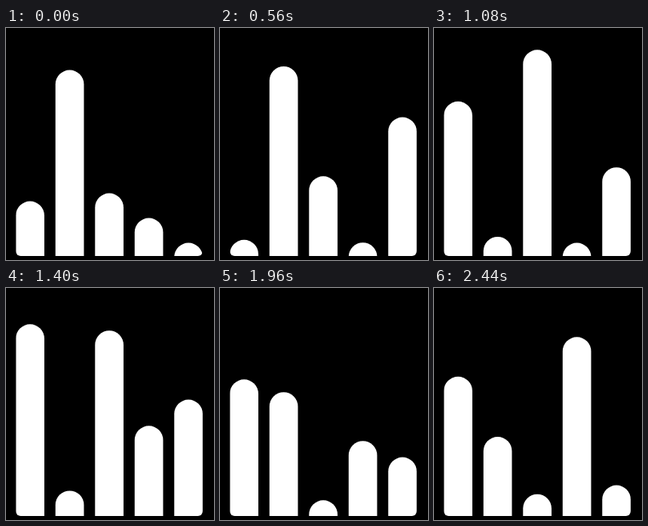
Animation, 260 px wide and 290 px high, one loop 2.48 s. Source, as an HTML page with a canvas:

```html
<!DOCTYPE html>
<html lang="en">
<head>
<meta charset="utf-8">
<title>Equalizer</title>
<style>
html, body { margin: 0; width: 100%; height: 100%; overflow: hidden; background: #000; }
canvas { display: block; }
</style>
</head>
<body>
<canvas id="stage" width="260" height="290"></canvas>
<script>
const ctx = document.getElementById('stage').getContext('2d');
const LOOP = 2480, STEP = 40;
const LEFT = 12.3, PITCH = 49.5, WIDTH = 35.6, FLOOR = 285, CORNER = 6;

// A bar swings between turning points, given as (time in ms, y of its top),
// and comes to rest at each of them.
const at = (time, top) => ({ time, top });
const bars = [
  [at(0, 217), at(500, 268), at(1350, 40), at(1730, 177), at(2250, 25), at(2480, 118)],
  [at(0, 53), at(500, 43), at(1100, 262), at(1640, 248), at(2250, 30), at(2520, 226)],
  [at(0, 207), at(440, 205), at(1000, 28), at(1310, 26), at(1720, 268), at(2480, 258)],
  [at(0, 238), at(600, 269), at(1120, 269), at(1740, 42), at(2100, 265), at(2500, 50)],
  [at(0, 269), at(560, 112), at(880, 188), at(1450, 139), at(2280, 247)]
];

const swing = u => (1 - Math.cos(Math.PI * u)) / 2;

function topAt(turns, time) {
  const next = turns.findIndex(turn => turn.time > time);
  if (next < 0) return turns[turns.length - 1].top;
  const a = turns[next - 1], b = turns[next];
  return a.top + (b.top - a.top) * swing((time - a.time) / (b.time - a.time));
}

function draw(time) {
  ctx.fillStyle = '#000';
  ctx.fillRect(0, 0, 260, 290);
  ctx.save();
  ctx.beginPath();
  ctx.roundRect(LEFT, 0, 4 * PITCH + WIDTH, FLOOR, [0, 0, CORNER, CORNER]);
  ctx.clip();
  ctx.fillStyle = '#fff';
  bars.forEach((turns, i) => {
    ctx.beginPath();
    ctx.roundRect(LEFT + i * PITCH, topAt(turns, time) - 0.4, WIDTH, 300, WIDTH / 2);
    ctx.fill();
  });
  ctx.restore();
}

const start = performance.now();
function tick() {
  const time = (performance.now() - start) % LOOP;
  draw(Math.floor(time / STEP) * STEP);
  requestAnimationFrame(tick);
}
tick();
</script>
</body>
</html>
```
